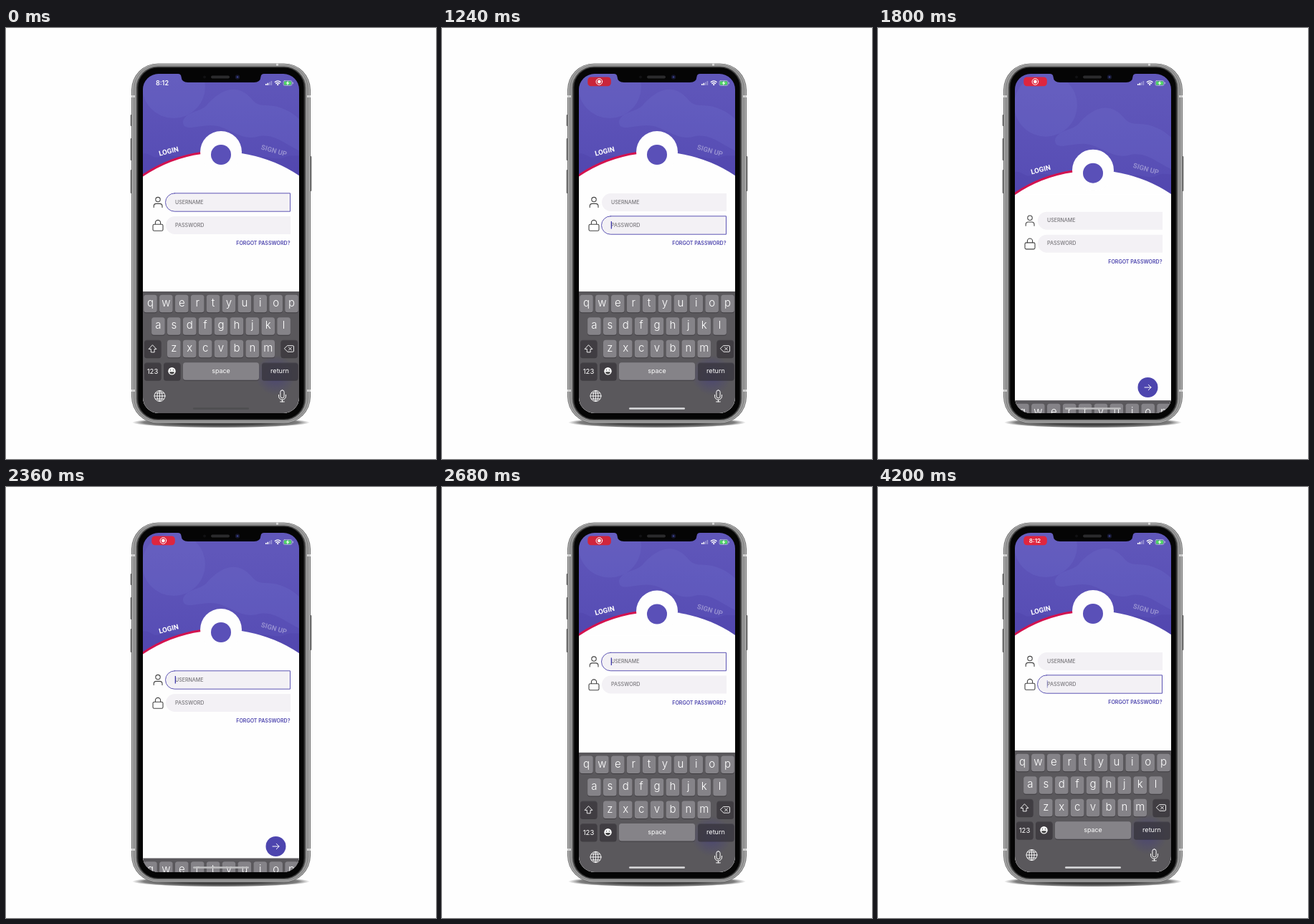
Recreate the animation shown at these times as an HTML page with a canvas. Size 600 by 602 pixels, loop 4.24 s.

```html
<!DOCTYPE html>
<html lang="en">
<head>
<meta charset="utf-8">
<title>Login screen</title>
<style>
  html, body { margin: 0; width: 100%; height: 100%; overflow: hidden; background: #fefefe; }
  canvas { display: block; width: 600px; height: 602px; }
</style>
</head>
<body>
<canvas id="stage"></canvas>
<script>
const LOOP = 4240;
const PURPLE = '#4d45ae';
const SANS = 'Inter, "Liberation Sans", sans-serif';
const canvas = document.getElementById('stage');
const c = canvas.getContext('2d');
const dpr = window.devicePixelRatio || 1;
canvas.width = 600 * dpr;
canvas.height = 602 * dpr;

const clamp = v => Math.max(0, Math.min(1, v));
const ramp = (t, from, to) => clamp((t - from) / (to - from));

// Critically damped settle from 0 to 1
function settle(ms, rate) {
  if (ms <= 0) return 0;
  const x = ms / 1000 * rate;
  return 1 - (1 + x) * Math.exp(-x);
}

function box(x, y, w, h, r, fill) {
  c.beginPath();
  c.roundRect(x, y, w, h, r);
  c.fillStyle = fill;
  c.fill();
}

function disc(x, y, r, fill) {
  c.beginPath();
  c.arc(x, y, r, 0, Math.PI * 2);
  c.fillStyle = fill;
  c.fill();
}

function line(path, color, width) {
  c.strokeStyle = color;
  c.lineWidth = width;
  c.lineCap = c.lineJoin = 'round';
  c.stroke(new Path2D(path));
}

function text(str, x, y, font, fill, align = 'center') {
  c.font = font;
  c.fillStyle = fill;
  c.textAlign = align;
  c.textBaseline = 'alphabetic';
  c.fillText(str, x, y);
}

// Font size at which the text takes up the given width
function sizeFor(str, width, style, family) {
  c.font = `${style} 100px ${family}`;
  return width / c.measureText(str).width * 100;
}

function fitted(str, x, y, width, style, fill, align) {
  const size = sizeFor(str, width, style, SANS);
  text(str, x, y, `${style} ${size}px ${SANS}`, fill, align);
}

function tab(str, x, y, angle, width, fill) {
  const family = 'Roboto, "Liberation Sans", sans-serif';
  const style = 'condensed 700';
  const size = Math.min(15.5, sizeFor(str, width, style, family));
  c.save();
  c.translate(x, y);
  c.rotate(angle * Math.PI / 180);
  text(str, 0, size * 0.36, `${style} ${size}px ${family}`, fill);
  c.restore();
}

function drawPhone() {
  c.save();
  c.translate(300, 551);
  c.scale(1, 0.06);
  const g = c.createRadialGradient(0, 0, 60, 0, 0, 124);
  g.addColorStop(0, 'rgba(0,0,0,.75)');
  g.addColorStop(0.75, 'rgba(0,0,0,.5)');
  g.addColorStop(1, 'rgba(0,0,0,0)');
  c.fillStyle = g;
  c.fillRect(-126, -126, 252, 252);
  c.restore();

  [[121, 16], [154, 31], [198, 33]].forEach(([y, h]) => box(173.6, y, 3, h, 1, '#6d6d6d'));
  box(423.4, 179, 3, 49, 1, '#6d6d6d');

  const shell = [
    [0, '#6a6a6a'], [1, '#b9b9b9'], [2.2, '#8d8d8d'], [5, '#a2a2a2'],
    [6.4, '#5c5c5c'], [8, '#2a2a2a'], [9.5, '#050505']
  ];
  for (const [d, color] of shell) {
    const top = d * 0.62;
    box(175 + d, 49.5 + top, 250 - 2 * d, 502.5 - 2 * top, 37 - d, color);
  }
  for (const y of [94, 505]) {
    box(175, y, 5, 3, 0, '#cfcfcf');
    box(420, y, 5, 3, 0, '#cfcfcf');
  }
  box(377, 49.5, 3, 3, 0, '#d8d8d8');
}

function drawNotch() {
  c.fillStyle = '#050505';
  c.fill(new Path2D('M240 63H360V64Q356 64 355.5 68Q355 76 346 76H254Q245 76 244.5 68Q244 64 240 64Z'));
  box(286, 66.5, 26, 4, 2, '#2b2b2d');
  disc(323, 68.5, 3.2, '#15162c');
  disc(323, 68.5, 1.3, '#3a418c');
  disc(310 - 33, 68.5, 2, '#111113');
}

function drawHeader(dy) {
  c.save();
  c.translate(0, dy);
  const g = c.createLinearGradient(0, 64, 0, 205);
  g.addColorStop(0, '#6057ba');
  g.addColorStop(1, '#564cb4');
  c.fillStyle = g;
  c.fillRect(190, 30, 220, 190);

  const glow = 'rgba(125,130,215,.16)';
  disc(234, 82, 44, glow);
  c.fillStyle = glow;
  c.fill(new Path2D('M247 130C252 116 270 118 280 108C292 94 312 78 332 90C346 98 344 108 362 108C384 108 400 118 410 128V172C386 160 372 146 350 152C326 158 310 136 286 136C266 136 246 146 247 130Z'));
  c.fillStyle = 'rgba(70,58,160,.22)';
  c.fill(new Path2D('M190 176C200 172 204 184 214 180C226 174 236 182 250 178V210H190ZM350 184C362 174 376 188 390 180C398 176 404 180 410 178V210H350Z'));

  disc(300, 368, 195, '#fefefe');
  c.fillStyle = '#fefefe';
  c.fillRect(190, 207, 220, 400);

  c.beginPath();
  c.arc(300, 368, 195.5, Math.PI * 1.5 - 0.62, Math.PI * 1.5 - 0.14);
  c.strokeStyle = '#d3124f';
  c.lineWidth = 3;
  c.lineCap = 'butt';
  c.stroke();

  disc(300, 173, 29, '#fefefe');
  disc(300, 177, 14, '#5a50b8');
  tab('LOGIN', 227, 172, -14, 28, '#fff');
  tab('SIGN UP', 374, 171, 16, 37, 'rgba(255,255,255,.36)');
  c.restore();
}

function drawField(y, label, focused, caret) {
  box(223, y, 174, 25, [12.5, 0, 0, 12.5], '#f3f1f5');
  if (focused) {
    c.beginPath();
    c.roundRect(222.5, y - 0.2, 174, 25.4, [12.7, 0, 0, 12.7]);
    c.strokeStyle = '#5d55b4';
    c.lineWidth = 1;
    c.stroke();
  }
  fitted(label, 236, y + 14.8, label === 'USERNAME' ? 39.5 : 40.5, 500, '#77757a', 'left');
  if (focused && caret > 0) {
    c.globalAlpha = caret;
    box(235.7, y + 7, 1.3, 10.5, 0, '#453fae');
    c.globalAlpha = 1;
  }
}

function drawForm(dy, focus, caret) {
  c.save();
  c.translate(0, dy);
  line('M215.2 239.6a3.2 3.2 0 1 1-6.4 0a3.2 3.2 0 1 1 6.4 0M206.2 250.5V249q0-3.6 3.6-3.6h4.6q3.6 0 3.6 3.6v1.5', '#444', 1.1);
  line('M207 274.2h10.2q1.8 0 1.8 1.8v5.4q0 1.8-1.8 1.8h-10.4q-1.8 0-1.8-1.8v-5.4q0-1.8 2-1.8M208.4 274v-2a3.6 3.6 0 0 1 7.2 0v2', '#444', 1.1);
  drawField(231, 'USERNAME', focus === 'user', caret);
  drawField(263, 'PASSWORD', focus === 'pass', caret);
  fitted('FORGOT PASSWORD?', 396.5, 303.3, 75.5, 600, PURPLE, 'right');
  c.restore();

  disc(376.5, 502, 14, PURPLE);
  line('M372 502h9M377.3 498.2l3.8 3.8l-3.8 3.8', '#fff', 1);
}

function key(x, y, w, fill) {
  box(x, y + 1, w, 24.5, 3.5, 'rgba(40,38,43,.55)');
  box(x, y, w, 24.5, 3.5, fill);
}

function drawKeyboard(slide) {
  const dy = 170 * slide;
  const light = '#858388', dark = 'rgba(64,62,67,.75)';
  c.save();
  c.translate(0, dy);
  c.fillStyle = '#5a585c';
  c.fillRect(190, 368, 220, 172);
  c.globalAlpha = 1 - slide;
  const g = c.createRadialGradient(376, 485, 2, 376, 485, 28);
  g.addColorStop(0, 'rgba(62,55,135,.5)');
  g.addColorStop(1, 'rgba(62,55,135,0)');
  c.fillStyle = g;
  c.fillRect(345, 455, 65, 60);
  c.globalAlpha = 1;

  const pitch = 21.9;
  ['qwertyuiop', 'asdfghjkl', 'zxcvbnm'].forEach((row, r) => {
    [...row].forEach((ch, i) => {
      const x = 300 + (i - (row.length - 1) / 2) * pitch;
      const y = 372.7 + r * 31.5;
      key(x - 9.3, y, 18.6, light);
      text(ch, x, y + 16.2, `300 15px ${SANS}`, '#fff');
    });
  });

  key(193, 435.7, 23.5, dark);
  key(383.5, 435.7, 23.5, dark);
  line('M204.7 443l5.2 5.5h-2.8v4.4h-4.8v-4.4h-2.8Z', '#fff', 0.9);
  line('M393 443.7h7.2q1.3 0 1.3 1.3v6q0 1.3-1.3 1.3H393l-4.4-4.3ZM394.5 446l4 4M398.5 446l-4 4', '#fff', 0.9);

  key(193, 467.2, 23.5, dark);
  key(220, 467.2, 23.5, dark);
  key(247, 467.2, 106, light);
  key(357, 467.2, 50.5, 'rgba(64,62,72,.6)');
  fitted('123', 204.5, 482.6, 15.5, 400, '#fff');
  fitted('space', 300, 482.2, 25.5, 400, '#fff');
  fitted('return', 382, 482.2, 26, 400, '#fff');

  disc(231.5, 479.3, 5.2, '#fff');
  disc(229.6, 477.8, 0.8, '#444');
  disc(233.4, 477.8, 0.8, '#444');
  c.fillStyle = '#444';
  c.fill(new Path2D('M228.2 480.2h6.6a3.3 3.1 0 0 1-6.6 0Z'));

  line('M222 514a7.5 7.5 0 1 1-15 0a7.5 7.5 0 1 1 15 0M218 514a3.5 7.5 0 1 1-7 0a3.5 7.5 0 1 1 7 0M207 514h15M214.5 506.5v15M208.6 510h11.8M208.6 518h11.8', '#fff', 0.9);
  line('M385.5 505.8a2.6 2.6 0 0 1 2.6 2.6v5.8a2.6 2.6 0 0 1-5.2 0v-5.8a2.6 2.6 0 0 1 2.6-2.6M380.5 512.5v1.7a5 5 0 0 0 10 0v-1.7M385.5 519.3v2.7M382.7 522h5.6', '#fff', 1);
  c.restore();
}

function drawStatus(t) {
  const pill = ramp(t, 120, 400);
  const icon = ramp(t, 560, 720) * (1 - ramp(t, 3160, 3340));
  if (pill > 0) {
    const beat = 0.5 + 0.5 * Math.cos((t - 2080) / 1900 * Math.PI * 2);
    c.globalAlpha = pill;
    box(203.3, 68.5, 32.5, 12.7, 4.5,
      `rgb(${200 + 28 * beat},${36 + 2 * beat},${58 + 6 * beat})`);
  }
  c.globalAlpha = 1 - icon;
  fitted('8:12', 218 + pill, 80.3 - 2.1 * pill, 18 - 1.5 * pill, 600, '#fff');
  c.globalAlpha = icon;
  if (icon > 0) {
    c.beginPath();
    c.arc(219.4, 75, 4.3, 0, Math.PI * 2);
    c.strokeStyle = '#fff';
    c.lineWidth = 1;
    c.stroke();
    disc(219.4, 75, 2.4, '#fff');
  }
  c.globalAlpha = 1;

  for (let i = 0; i < 4; i++) {
    const h = 2 + i * 1.3;
    box(362 + i * 2.5, 80 - h, 1.7, h, 0.4, i < 2 ? '#fff' : 'rgba(255,255,255,.35)');
  }
  line('M375.3 75.6q3.9-3.5 7.8 0M376.8 77.5q2.4-2.1 4.8 0', '#fff', 1.3);
  disc(379.2, 79.2, 1.1, '#fff');
  c.beginPath();
  c.roundRect(387, 73.6, 12, 6.8, 1.8);
  c.strokeStyle = 'rgba(225,240,230,.75)';
  c.lineWidth = 0.7;
  c.stroke();
  box(387.9, 74.5, 10.2, 5, 1, '#4fd764');
  box(399.8, 75.8, 0.9, 2.4, 0.4, 'rgba(225,240,230,.75)');
  c.fillStyle = '#fff';
  c.fill(new Path2D('M393.8 73.6l-3 3.9h1.9l-.6 3l3.2-4h-2Z'));
}

// Each entry: moment, focused field, start of its caret cycle
const FOCUS = [
  [0, 'user', -560], [880, 'pass', 880], [1550, '', 0],
  [2325, 'user', 2325], [2900, 'pass', 2900]
];

function caretAlpha(ms) {
  const p = ms % 800;
  return p < 440 ? 1 : p < 720 ? 1 - ramp(p, 440, 540) : ramp(p, 720, 800);
}

function draw(t) {
  const slide = settle(t - 1576, 17) - settle(t - 2327, 17);
  const drop = 26 * (settle(t - 1540, 24) - settle(t - 2360, 18.2));
  const [, focus, start] = FOCUS.filter(f => f[0] <= t).pop();

  c.setTransform(dpr, 0, 0, dpr, 0, 0);
  c.fillStyle = '#fefefe';
  c.fillRect(0, 0, 600, 602);
  drawPhone();

  c.save();
  c.beginPath();
  c.roundRect(191, 64, 218, 474, 22);
  c.clip();
  drawHeader(drop);
  drawForm(drop, focus, caretAlpha(t - start));
  drawKeyboard(clamp(slide));
  const shine = ramp(t, 1150, 1230);
  const tone = 78 + shine * (142 - 34 * clamp(slide));
  box(261, 530.2, 78, 2.6, 1.3, `rgb(${tone},${tone},${tone + 2})`);
  drawStatus(t);
  c.restore();
  drawNotch();
}

const begin = performance.now();
function tick() {
  draw((performance.now() - begin) % LOOP);
  requestAnimationFrame(tick);
}
tick();
</script>
</body>
</html>
```
